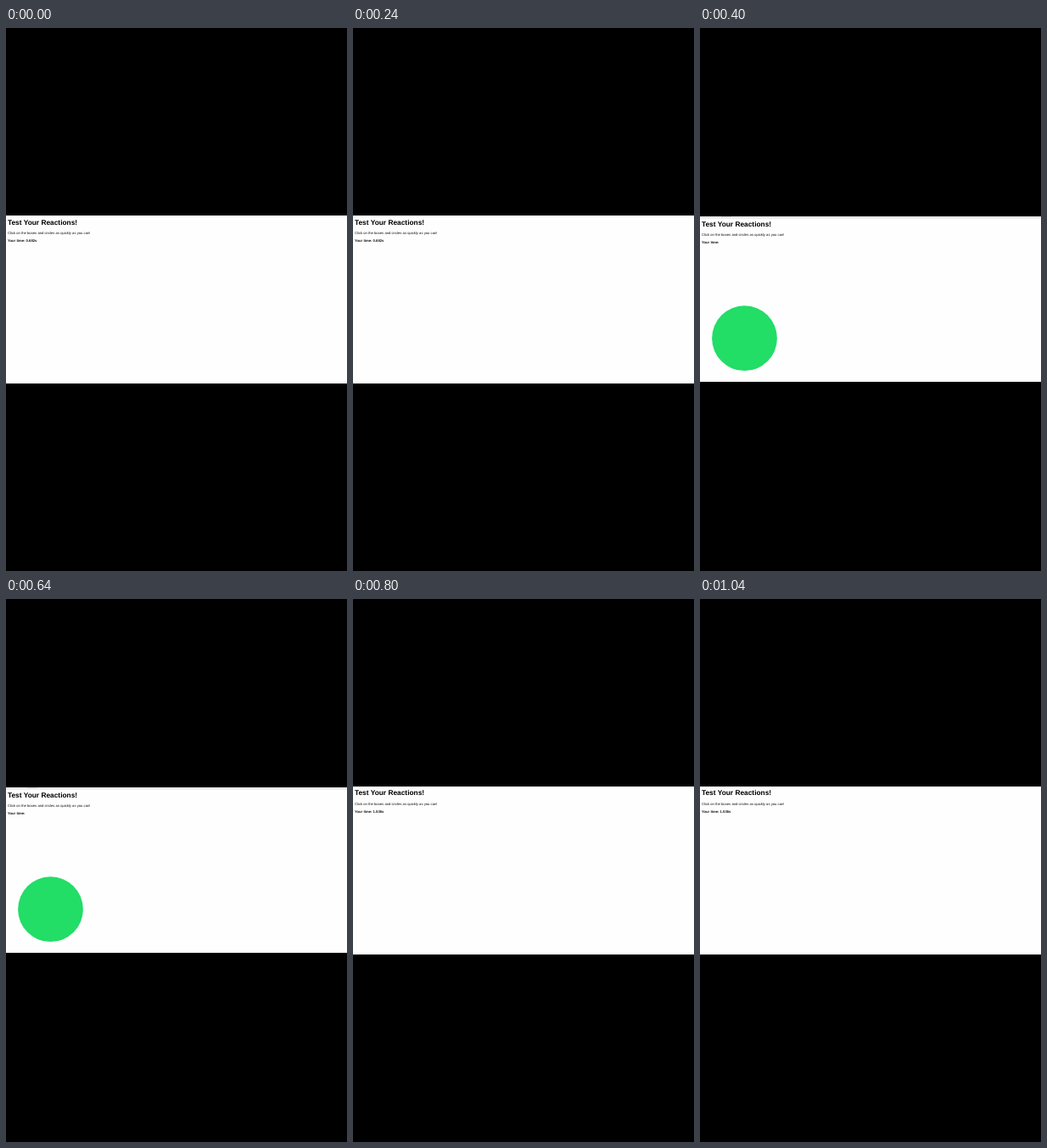
Animation of 402x640 px, one loop 1200 ms. Source, as an HTML page:

```html
<!DOCTYPE html>
<html lang="en">
<head>
<meta charset="utf-8">
<title>Reaction test</title>
<style>
  html, body { margin: 0; width: 100%; height: 100%; overflow: hidden; background: #000; }
  svg { display: block; width: 402px; height: 640px; }
  text { font: 4.2px "Liberation Sans", Arial, sans-serif; fill: #111; text-rendering: geometricPrecision; }
  .title { font-size: 8.35px; font-weight: bold; fill: #000; }
  .time { font-weight: bold; }
</style>
</head>
<body>
<svg id="stage" viewBox="0 0 402 640"></svg>
<script>
const STEP = 400;
const scenes = [
  { top: 221, bottom: 419, baseline: 232, time: "0.682s" },
  { top: 222, bottom: 417, baseline: 234, time: "", playing: true },
  { top: 221, bottom: 419, baseline: 231.4, time: "1.536s" },
];
const loop = STEP * scenes.length;
const stage = document.getElementById("stage");

function add(parent, tag, attrs, content = "") {
  const node = document.createElementNS("http://www.w3.org/2000/svg", tag);
  for (const [key, value] of Object.entries(attrs)) node.setAttribute(key, value);
  node.textContent = content;
  return parent.appendChild(node);
}

function rect(parent, x, y, width, height, fill) {
  add(parent, "rect", { x, y, width, height, fill });
}

const groups = scenes.map(({ top, bottom, baseline, time, playing }) => {
  const group = add(stage, "g", {});
  rect(group, 0, top, 402, bottom - top, "#fefefe");
  if (playing) {
    // Lower edge of the browser toolbar
    rect(group, 0, top, 402, 2.5, "#e6e6e6");
    rect(group, 25, top, 12, 1, "#d2d2d2");
    add(group, "circle", { cx: 52.5, cy: 365.7, r: 38.4, fill: "#22dd66" });
  }
  const line = (name, dy, content) =>
    add(group, "text", { class: name, x: 2, y: baseline + dy }, content);
  line("title", 0, "Test Your Reactions!");
  line("intro", 11.2, "Click on the boxes and circles as quickly as you can!");
  line("time", 20.2, `Your time: ${time}`);
  return group;
});

function draw() {
  const current = Math.floor((performance.now() % loop) / STEP);
  groups.forEach((group, i) => {
    group.style.display = i === current ? "" : "none";
  });
  requestAnimationFrame(draw);
}
draw();
</script>
</body>
</html>
```
